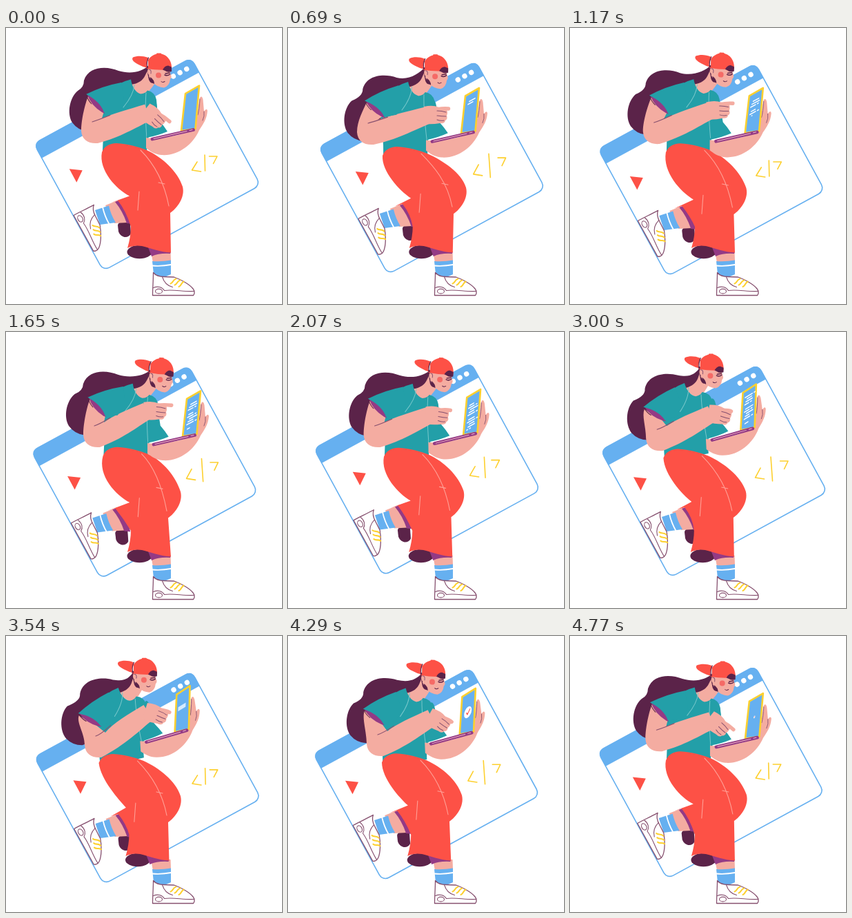
These frames come from a looping animation (400x400 px, 4.8 s). An HTML page:

```html
<!DOCTYPE html>
<html lang="en">
<head>
<meta charset="utf-8">
<title>Coding on the move</title>
<style>
html, body { margin: 0; width: 100%; height: 100%; overflow: hidden; background: #fff; }
svg { display: block; width: 100vw; height: 100vh; }
</style>
</head>
<body>
<svg id="stage" viewBox="0 0 400 400"></svg>
<script>
const LOOP = 4800, TAU = Math.PI * 2;
const RED = '#fd5146', BLUE = '#66b0f0', TEAL = '#239fa8', SKIN = '#f4aca1',
  DARK = '#5b2349', PURPLE = '#943a85', YELLOW = '#fdd02f', INK = '#86506f', WHITE = '#fff';
const stage = document.getElementById('stage');

function el(parent, tag, attrs = {}) {
  const node = document.createElementNS('http://www.w3.org/2000/svg', tag);
  set(node, attrs);
  return parent.appendChild(node);
}
function set(node, attrs) {
  for (const k in attrs) node.setAttribute(k, attrs[k]);
}
const group = (parent, transform = '') => el(parent, 'g', { transform });
const fill = (parent, color, d = '') => el(parent, 'path', { d, fill: color });
const line = (parent, color, width, d = '') => el(parent, 'path', {
  d, fill: 'none', stroke: color, 'stroke-width': width,
  'stroke-linecap': 'round', 'stroke-linejoin': 'round'
});
const move = (node, x, y, r = 0, cx = 0, cy = 0) =>
  set(node, { transform: `translate(${x} ${y}) rotate(${r} ${cx} ${cy})` });
const clamp = x => Math.max(0, Math.min(1, x));

// Cyclic smooth interpolation through a few poses
const BEATS = [0, 690, 1650, 2460, 3540, 4290];
const FINE = [0, 330, 690, 1150, 1650, 2460, 3000, 3540, 4290];
function track(values, times = BEATS) {
  const n = times.length;
  const at = i => {
    const lap = Math.floor(i / n), j = i - lap * n;
    return [times[j] + lap * LOOP, values[j]];
  };
  const slope = i => {
    const a = at(i - 1), b = at(i + 1);
    return (b[1] - a[1]) / (b[0] - a[0]);
  };
  return t => {
    let i = n - 1;
    while (times[i] > t) i--;
    const [t0, a] = at(i), [t1, b] = at(i + 1);
    const w = t1 - t0, u = (t - t0) / w, v = 1 - u;
    return v * v * (1 + 2 * u) * a + u * u * (3 - 2 * u) * b
      + w * u * v * (v * slope(i) - u * slope(i + 1));
  };
}

const pose = {
  hipX: track([0, -2, 1.5, -2, -4.5, -3]),
  hipY: track([0, -2, 4, 0, 0, 1, 0, 1, 1.5], FINE),
  lean: track([0, -1, -2.8, -1, 0.7, -1.8, -6.5, -7.8, -4.2], FINE),
  head: track([0, 0, 3, 2, 0, 1]),
  hairX: track([0, -6, -7, 0, 0, 0]),
  hairY: track([0, 7, 0, 1, 0, 0]),
  knee: track([0, 2, -3, 0, -3, -4]),
  elbowX: track([128, 119, 131, 126, 133, 133]),
  elbowY: track([148, 150, 148, 149, 157, 155]),
  wristX: track([205, 202, 204, 204, 206, 208]),
  wristY: track([122, 126, 114, 126, 110, 118]),
  wrist: track([38, 0, 2, 6, 18, 30]),
  finger: track([36, 33, 38, 29, 32, 31]),
  lapX: track([0, -3, 2, -2.5, -9, -5]),
  lapY: track([0, 3.5, 2, -2, -9, -6]),
  lapTurn: track([0, 0, 0, -2, -3.5, -2.5])
};

// Browser window
const win = group(stage);
const frame = group(win, 'translate(204 198) rotate(-28.6)');
el(frame, 'rect', { x: -129, y: -105, width: 259.5, height: 210, rx: 10, fill: WHITE, stroke: BLUE, 'stroke-width': 1.6 });
fill(frame, BLUE, 'M-129.500 -81V-95Q-129.500 -105.500 -119 -105.500H120.500Q131 -105.500 131 -95V-81Z');
for (const x of [95, 106, 117]) el(frame, 'circle', { cx: x, cy: -94, r: 3.7, fill: WHITE });
const arrow = fill(win, RED, 'M92 204L111 206L102.500 223.500Z');
const tag = line(win, YELLOW, 1.6);

function drawWindow(t, wx, wy) {
  move(win, wx, wy);
  const a = 6 * Math.sin(TAU * t / 1600) - 0.3;
  move(arrow, a * 0.88, a * -0.48);
  const s = (1 - Math.cos(TAU * t / 1200)) / 2;
  const lx = -5 * s, rx = 6 * s;
  tag.setAttribute('d',
    `M${277 + lx} ${194 - s}L${269.5 + lx} ${206 + s}L${282.5 + lx} ${208 + s}` +
    `M${288 - s} ${184 - 7 * s}L${288.5 + s} ${207 + 5 * s}` +
    `M${294.5 + rx} ${186 - 3 * s}L${306 + rx} ${186 - 3 * s}L${300.5 + rx} ${196.5 - 2 * s}`);
}

// Shoes share one drawing, origin at the heel
function shoe(parent, transform) {
  const g = group(parent, transform);
  set(fill(g, WHITE, 'M1 -33C5 -28 11 -27 17 -27L31 -26.500C41 -23 54 -16 59 -9C62 -5 60 -1 59 0H0C0 -12 1 -20 1 -33Z'),
    { stroke: INK, 'stroke-width': 1.3, 'stroke-linejoin': 'round' });
  line(g, INK, 1.1, 'M1 -11C8 -14 14 -12 17 -7C30 -9 45 -5 60 -6M14 -27C16 -20 21 -14 29 -12');
  el(g, 'ellipse', { cx: 9, cy: -6, rx: 5, ry: 3.4, fill: WHITE, stroke: INK, 'stroke-width': 1.1 });
  line(g, YELLOW, 2.1, 'M26 -17C30 -18 29 -23 34 -24M32 -15C36 -16 35 -21 40 -22M38 -12.500C42 -14 41 -18 45 -20');
}

// Hair, neck and shirt lean together
const body = group(stage);
const hair = fill(body, DARK);

// Legs
const backLeg = group(stage);
fill(backLeg, DARK, 'M162 286C162 279 178 278 180 283L181 298C177 306 166 304 163 295Z');
fill(backLeg, SKIN, 'M144 257L164 249L176 282L157 283Z');
fill(backLeg, PURPLE, 'M158 252L174 246L184 284L175 283Q169 265 158 252Z');
fill(backLeg, BLUE, 'M129 264L149 257.500Q152 271 159 282L136 285Z');
line(backLeg, WHITE, 1.8, 'M140 259.500Q143 273 150 285');
shoe(backLeg, 'translate(98 271.500) rotate(61)');

const shin = group(stage);
fill(shin, SKIN, 'M210 324H238.500L239 338L213 340Z');
fill(shin, BLUE, 'M212 338Q226 339 239 336.500L239 357Q227 364 214 357Z');
line(shin, WHITE, 1.8, 'M212.500 344.500Q226 345.500 239 343');
shoe(shin, 'translate(212.500 387.500)');
const hem = group(stage);
el(hem, 'ellipse', { cx: 193.5, cy: 324.5, rx: 18, ry: 9.7, fill: DARK });
fill(hem, PURPLE, 'M206 318L239 324L238 327Q222 326 211 331Z');

// Shirt
const torso = group(stage);
fill(torso, SKIN, 'M205 62L216 80Q212 86 205 94Q194 103 181 82Q197 80 202 68Z');
fill(torso, TEAL, 'M148 92Q162 79 181 74.500Q184 92 195 95.500Q202 95 205 90.500Q216 93 218 104L220 128L205 162L204 180Q170 184 140 178Q142 150 137 130Z');
line(torso, '#78c7cb', 1, 'M186 82Q185 97 170 115M203 94Q201 120 204 160');

const pants = fill(stage, RED);
const seams = line(stage, '#ffa096', 1.1);

function drawLegs(wx, wy, hx, hy, kx) {
  const at = (dx, dy) => (x, y) => `${x + dx} ${y + dy} `;
  const h = at(hx, hy), k = at(kx, wy * 0.25), b = at(wx, wy);
  const c = at(hx * 1.2 + wx * 0.4, wy * 0.65);
  const thigh = at(hx * -0.8, wy * 0.4);
  const mx = hx * 0.6 + wx * 0.25, m = at(mx, 0);
  move(backLeg, wx, wy);
  move(hem, mx, 0);
  set(pants, { d: 'M' + h(139, 180) + 'C' + h(142, 172) + h(150, 167) + h(160, 167)
    + 'C' + h(176, 168) + h(192, 172) + h(204, 177)
    + 'C' + h(226, 187) + k(249, 208) + k(256, 230)
    + 'C' + k(260, 246) + k(247, 262) + k(238, 268)
    + 'L' + m(239, 325.5) + 'C' + m(224, 325) + m(210, 319) + m(197, 316)
    + 'Q' + m(185, 314) + m(176, 319)
    + 'Q' + m(181, 302) + m(181, 288) + 'Q' + b(174, 265) + b(162, 250)
    + 'L' + b(151, 253.5) + 'L' + c(179, 243.5)
    + 'C' + thigh(160, 234) + thigh(134, 206) + h(139, 180) + 'Z' });
  set(seams, { d: 'M' + h(195, 177) + 'C' + h(214, 196) + k(229, 222) + k(236, 258)
    + 'M' + k(221, 224) + 'L' + k(230, 226) + 'M' + c(193, 237) + 'Q' + c(192, 250) + c(191, 264) });
}

// Far arm and laptop
const lap = group(stage);
fill(lap, SKIN, 'M203 159C216 161 250 158 268 148C279 140 277 119 281 101Q284 97 285.500 104L287 121Q291 115 292 120C291 132 286 139 280 148C271 169 249 186 225 184C215 183 208 178 203 174Z');
line(lap, INK, 0.9, 'M287 121Q288 128 285 134M281 103Q280 118 278 126');
const cuff = group(stage);
fill(cuff, TEAL, 'M212 102Q217 98 219 116L222 134Q229 142 234 150Q220 156 204 159Z');
const deck = group(stage);
set(fill(deck, BLUE, 'M260 95L280 83.500L274.500 146L254 149Z'),
  { stroke: YELLOW, 'stroke-width': 2.6, 'stroke-linejoin': 'round' });
line(deck, PURPLE, 4.8, 'M212 161L271.500 147.500');
line(deck, '#f1b4c4', 1, 'M214 160.500L262 149.500M266 148.500L270 147.500');
// Screen space: 20 wide, 54 high
const screen = group(deck, 'matrix(.94 -.51 -.1 1 261 96.500)');
const code = line(screen, WHITE, 1.7);
const bar = el(screen, 'rect', { x: 2, y: 18, height: 6, fill: '#d5eaff' });
const badge = group(screen);
el(badge, 'ellipse', { rx: 6, ry: 8, fill: WHITE });
line(badge, RED, 1.4, 'M-2 0L-0.500 3L3 -3');

function drawScreen(t) {
  let d = '';
  if (t < 3050) {
    const typed = Math.max(0, (t - 400) / 110);
    const scroll = Math.max(0, typed - 12);
    for (let i = Math.floor(scroll) + 1; i < typed; i++) {
      if (i % 6 == 4) continue;
      const y = 6 + (i - scroll) * 3.5;
      const x = 3 + (i * 5 % 3) * 1.6;
      const w = (6 + (i * 7) % 5 * 1.3) * clamp(typed - i);
      d += `M${x} ${y}h${w}`;
      if (i % 3 == 0) d += `M${x + w + 3} ${y}h1.5`;
    }
  }
  code.setAttribute('d', d);
  const on = t > 3150 && t < 3850;
  bar.setAttribute('width', on ? 14 * clamp((t - 3150) / 450) : 0);
  const s = Math.min(clamp((t - 3850) / 250), clamp((4800 - t) / 260));
  set(badge, { transform: `translate(9.5 26) scale(${s * (2 - s)})` });
}

// Head
const neckSpace = group(stage);
const head = group(neckSpace);
fill(head, DARK, 'M203 55L211 57Q208 70 215 79Q210 82 207 75Z');
fill(head, SKIN, 'M208 55L237 59L238.500 67Q241 71 238 74Q237 84 229 86.500Q219 86 213 79L207 70Z');
el(head, 'circle', { cx: 221, cy: 68.5, r: 4, fill: '#f56a66' });
el(head, 'ellipse', { cx: 209, cy: 63, rx: 4, ry: 5.5, fill: SKIN });
line(head, INK, 1, 'M207 60Q211 60 210 66');
fill(head, DARK, 'M209 71Q215 75 215 81Q209 79 209 71Z');
line(head, DARK, 1.5, 'M230 68Q234 70 237.500 67M231 66L237 65');
line(head, DARK, 1, 'M225 77.500Q227 79.500 230 77.500');
fill(head, RED, 'M206 43C198 40 190 40 184 42.500C181 46 186 50 192 53Q199 57 206 58ZM204 59C202 46 211 38 222 37C234 38 241 48 240 60Q222 62 204 59Z');
fill(head, DARK, 'M227 60.500Q230 54.500 235 54.500L240 56.500L240 63Q234 65 230.500 62Z');
line(head, DARK, 1.2, 'M206.500 43Q203 50 205 58');
line(head, RED, 2, 'M219 37.500H224');

// Near arm
const arm = fill(stage, SKIN);
const fold = line(stage, INK, 1.1);
const hand = group(stage);
fill(hand, SKIN, 'M-5 -12Q8 -15 17 -11L28 -8Q30 -3 28 1Q30 6 26 8Q25 13 18 12Q8 14 -5 13Z');
const finger = line(hand, SKIN, 5.4);
line(hand, INK, 1, 'M14 -6Q21 -6 27 -4M14 1Q21 2 27 2M14 7Q19 9 24 8');
const shoulder = group(stage);
const sleeve = group(shoulder);
fill(sleeve, PURPLE, 'M118 97Q123 112 139 122L143 124Q138 108 127 99Z');
fill(sleeve, TEAL, 'M116 96Q140 84 167 79L171 105L160 121L142 122Q136 106 116 96Z');
line(sleeve, DARK, 1, 'M116.500 97Q119 105 124 110');

function drawArm(t, lean, spot) {
  const ex = pose.elbowX(t), ey = pose.elbowY(t), wx = pose.wristX(t), wy = pose.wristY(t);
  const len = Math.hypot(wx - ex, wy - ey), dx = (wx - ex) / len, dy = (wy - ey) / len;
  const e = (x, y) => `${ex + x} ${ey + y} `;
  // along the forearm, then across it
  const f = (u, v) => `${ex + dx * len * u - dy * v} ${ey + dy * len * u + dx * v} `;
  const [ax, ay] = spot(119, 99 - lean), [bx, by] = spot(142, 121 - lean * 0.4);
  set(arm, { d: `M${ax} ${ay}C${ax - 4} ${ay + 10} ` + e(-19, -16) + e(-19, 1)
    + 'C' + e(-18, 14) + e(-9, 20) + e(5, 19)
    + 'C' + f(0.4, 22) + f(0.7, 16) + f(1, 13)
    + 'L' + f(1, -12) + 'C' + f(0.7, -13) + f(0.4, -14) + e(11, -17) + `L${bx} ${by}Z` });
  set(fold, { d: 'M' + e(-3, -12) + 'Q' + e(4, -14) + f(0.35, -13) });
  move(sleeve, 0, 0, lean * 1.1, 168, 85);
  move(hand, wx, wy, pose.wrist(t));
  finger.setAttribute('d', `M14 -8Q24 -10 ${pose.finger(t) - 2.5} -9`);
}

function drawHair(t, lean) {
  const hx = pose.hairX(t), hy = pose.hairY(t);
  const low = (x, y) => `${x + hx} ${y + hy} `;
  // the upper wave trails the lean
  const top = (x, y) => `${x - lean * 1.5 + hx * 0.4} ${y + hy * 0.8} `;
  set(hair, { d: 'M207 54C197 64 ' + top(180, 67) + top(163, 62)
    + 'C' + top(146, 55) + top(120, 55) + top(113, 76) + 'Q' + top(113, 86) + low(104, 91)
    + 'C' + low(92, 101) + low(88, 124) + low(96, 137) + 'Q' + low(104, 148) + low(118, 150)
    + 'L160 140L190 82Q204 78 210 64Z' });
}

function draw(t) {
  const a = TAU * t / 2400;
  const wx = 4 * Math.sin(a), wy = 4 * (1 - Math.cos(a));
  const hx = pose.hipX(t), hy = pose.hipY(t), lean = pose.lean(t);
  const r = lean * Math.PI / 180, cos = Math.cos(r), sin = Math.sin(r);
  const spot = (x, y) => [
    170 + hx + (x - 170) * cos - (y - 175) * sin,
    175 + hy + (x - 170) * sin + (y - 175) * cos
  ];
  drawWindow(t, wx, wy);
  for (const g of [body, torso, neckSpace, shoulder]) move(g, hx, hy, lean, 170, 175);
  drawHair(t, lean);
  drawLegs(wx, wy, hx, hy - lean * 0.4, pose.knee(t));
  const lx = pose.lapX(t), ly = pose.lapY(t), turn = pose.lapTurn(t);
  move(lap, lx, ly, turn, 240, 155);
  move(deck, lx, ly, turn, 240, 155);
  move(cuff, lx * 0.9, ly * 0.8, lean * 0.5, 210, 130);
  drawScreen(t);
  move(head, 0, 0, pose.head(t) - lean, 221, 56);
  drawArm(t, lean, spot);
}

function tick() {
  draw(performance.now() % LOOP);
  requestAnimationFrame(tick);
}
tick();
</script>
</body>
</html>
```
